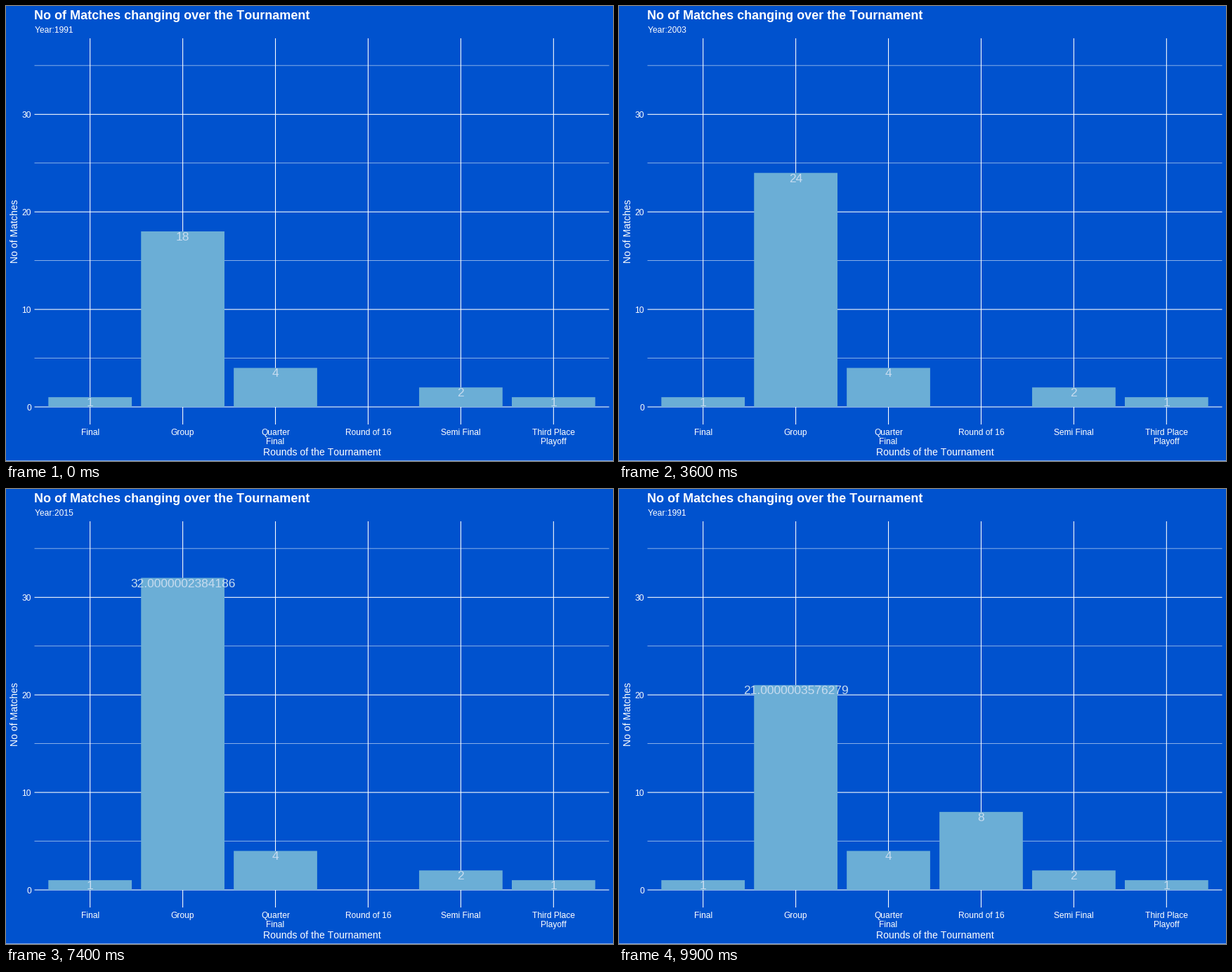
These frames come from a looping animation (864 px wide and 648 px high, 10000 ms). A matplotlib script:

```python
import numpy as np
import matplotlib.pyplot as plt
from matplotlib.animation import FuncAnimation
from matplotlib.patches import Rectangle

W, H = 864, 648
LEFT, RIGHT, TOP, BOTTOM = 40.5, 858.5, 46, 596
STEP = (RIGHT - LEFT) / 6.2      # one category
UNIT = (BOTTOM - TOP) / 39.6     # one match
ZERO = BOTTOM - 1.8 * UNIT
MAJOR, MINOR = 1.07, 0.53        # grid line widths
BLUE, BAR, LABEL = "#0052CE", "#6BAED6", "#C6DBEF"

ROUNDS = ["Final", "Group", "Quarter\nFinal", "Round of 16",
          "Semi Final", "Third Place\nPlayoff"]
MATCHES = [1, 18, 4, 8, 2, 1]
GROUP, LAST16 = 1, 3

# One state per tournament; each transition takes six frames.
FRAMES, TWEEN = 100, 6
STARTS = [7, 20, 33, 46, 59, 71, 83, 95]
GROUP_COUNTS = [18, 18, 24, 24, 24, 24, 36, 36, 18]

plt.rcParams["font.family"] = "Liberation Sans"
plt.rcParams["text.kerning_factor"] = 6  # practically no kerning

fig = plt.figure(figsize=(W / 72, H / 72), dpi=72, facecolor=BLUE)
ax = fig.add_axes([0, 0, 1, 1])
ax.set_xlim(0, W)
ax.set_ylim(H, 0)
ax.axis("off")


def box(x, y, w, h, color, z=1, alpha=1):
    return ax.add_patch(Rectangle((x, y), w, h, fc=color, lw=0, alpha=alpha,
                                  zorder=z, snap=False))


def text(x, y, s, size, ha="left", color="white", **kw):
    return ax.text(x, y, s, fontsize=size, ha=ha, va="baseline",
                   color=color, zorder=4, **kw)


def center(k):
    return LEFT + STEP * (0.6 + k)


def height(value):
    return ZERO - value * UNIT


def draw_grid():
    for v in range(0, 36, 5):
        y = height(v)
        major = v % 10 == 0
        width = MAJOR if major else MINOR
        box(LEFT, y - width / 2, RIGHT - LEFT, width, "white")
        if major:
            text(36, y + 4.6, str(v), 12, "right")
    for k, name in enumerate(ROUNDS):
        box(center(k) - MAJOR / 2, TOP, MAJOR, BOTTOM - TOP, "white")
        for row, line in enumerate(name.split("\n")):
            text(center(k), 611 + 13 * row, line, 12, "center")


def draw_titles():
    text(LEFT, 19, "No of Matches changing over the Tournament", 18,
         weight="bold")
    text((LEFT + RIGHT) / 2, 640, "Rounds of the Tournament", 14, "center")
    text(17, (TOP + BOTTOM) / 2, "No of Matches", 14, "center",
         rotation=90, rotation_mode="anchor")
    box(0, H - 1, W, 1, "white", alpha=0.5)


def draw_bar(k, value):
    y = height(value)
    bar = box(center(k) - 0.45 * STEP, y, 0.9 * STEP, ZERO - y, BAR, z=2)
    label = text(center(k), y + 13, str(value), 17.4, "center", LABEL)
    return bar, label


draw_grid()
draw_titles()
year = text(LEFT, 38, "", 12)
bars = [draw_bar(k, v) for k, v in enumerate(MATCHES)]


def group_count(frame):
    i = sum(s <= frame for s in STARTS)
    if i == 0:
        return GROUP_COUNTS[0]
    a, b = GROUP_COUNTS[i - 1], GROUP_COUNTS[i]
    k = min(frame - STARTS[i - 1] + 1, TWEEN)
    # Single precision leaves the long decimals in the label.
    return a + (b - a) * float(np.float32(k / TWEEN))


def update(frame):
    passed = sum(s + 3 <= frame for s in STARTS) % len(STARTS)
    year.set_text(f"Year:{1991 + 4 * passed}")

    value = group_count(frame)
    y = height(value)
    bar, label = bars[GROUP]
    bar.set_y(y)
    bar.set_height(ZERO - y)
    label.set_y(y + 13)
    label.set_text(f"{value:.15g}")

    for part in bars[LAST16]:
        part.set_visible(frame >= STARTS[5] + TWEEN - 1)
    return [year, bar, label, *bars[LAST16]]


anim = FuncAnimation(fig, update, frames=FRAMES, interval=100,
                     init_func=lambda: update(0), repeat=True,
                     repeat_delay=0, blit=False)
plt.show()
```
